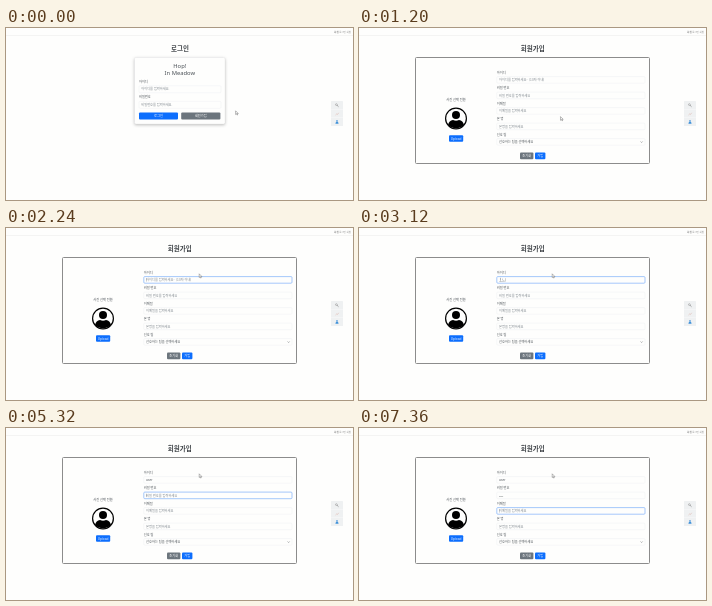
An HTML page that plays this animation: 347 by 172 pixels, repeating every 8 s.

```html
<!DOCTYPE html>
<html lang="ko">
<head>
<meta charset="utf-8">
<style>
  html, body { margin: 0; width: 100%; height: 100%; overflow: hidden; background: #fefefd; }
  svg { display: block; width: 347px; height: 172px; }
  text { font-family: "Noto Sans CJK KR", "Noto Sans CJK", "Noto Sans", sans-serif; white-space: pre; }
  .latin { font-family: "Noto Sans", "Open Sans", sans-serif; }
  .card { filter: drop-shadow(0 1.4px 1.6px rgba(0, 0, 0, .25)); }
</style>
</head>
<body>
<svg id="stage" viewBox="0 0 347 172"></svg>
<script>
const LOOP = 8000;
const BLUE = '#0d6efd', GREY = '#6c757d', INK = '#4a5056', HINT = '#7d858c', PAPER = '#fefefd';
const stage = document.getElementById('stage');

function add(parent, tag, attrs = {}, content = '') {
  const node = document.createElementNS('http://www.w3.org/2000/svg', tag);
  for (const key in attrs) node.setAttribute(key, attrs[key]);
  node.textContent = content;
  parent.append(node);
  return node;
}
const group = parent => add(parent, 'g');
const box = (parent, x, y, width, height, attrs) =>
  add(parent, 'rect', { x, y, width, height, rx: 1, ...attrs });
const path = (parent, d, attrs) => add(parent, 'path', { d, fill: 'none', ...attrs });

// y is the vertical middle of the line of text
function label(parent, content, x, y, attrs = {}) {
  const size = attrs['font-size'] || 3.2;
  return add(parent, 'text', { x, y: y + size * .37, 'font-size': size, fill: INK, ...attrs }, content);
}
const centered = (parent, content, x, y, attrs) =>
  label(parent, content, x, y, { 'text-anchor': 'middle', ...attrs });

function button(parent, content, x, y, width, height, fill) {
  const rect = box(parent, x, y, width, height, { fill });
  centered(parent, content, x + width / 2, y + height / 2, { fill: '#fff' });
  return rect;
}

function field(parent, name, hint, x, y, width, height, hintColor = HINT) {
  label(parent, name, x, y - height / 2 - 4.1);
  const top = y - height / 2;
  box(parent, x, top, width, height, { fill: 'none', stroke: '#dfe2e6', 'stroke-width': .25 });
  const ring = box(parent, x, top, width, height, { fill: 'none', stroke: '#86b7fe', 'stroke-width': .7 });
  const text = label(parent, hint, x + 2.3, y);
  const caret = box(parent, x + 2.2, y - 1.7, .25, 3.4, { rx: 0, fill: INK });

  function update(value, focus) {
    ring.setAttribute('opacity', focus);
    text.textContent = value || hint;
    text.setAttribute('fill', value ? INK : hintColor);
    caret.setAttribute('opacity', focus > .5 ? 1 : 0);
    caret.setAttribute('x', x + 2.2 + (value ? text.getComputedTextLength() + .2 : 0));
  }
  update('', 0);
  return update;
}

// Shared page frame
box(stage, 0, 7, 347, .4, { rx: 0, fill: '#e2e3e4' });
label(stage, '회원', 328, 3.9, { 'font-size': 2.6, fill: '#666' });
label(stage, '로그인 회원', 333.2, 3.9, { 'font-size': 2.4, fill: '#888' });
box(stage, 325, 73, 12, 25, { rx: .6, fill: '#eff1f2' });
for (const y of [81.3, 89.7]) box(stage, 325, y, 12, .3, { rx: 0, fill: PAPER });
add(stage, 'circle', { cx: 330.4, cy: 76.6, r: .9, fill: 'none', stroke: '#888', 'stroke-width': .5 });
path(stage, 'M331.1 77.3l1.4 1.4', { stroke: '#666', 'stroke-width': .6 });
path(stage, 'M329.5 87l1.1-1 .8.5 1.3-1.7', { stroke: '#d9aaa2', 'stroke-width': .5 });
add(stage, 'circle', { cx: 331, cy: 92.9, r: .9, fill: '#5fa2de' });
path(stage, 'M329.4 95.8q0-2 1.6-2t1.6 2z', { fill: '#3c8fd8' });

// Login page
const login = group(stage);
const title = { 'font-size': 6.5, 'font-weight': 700, fill: '#3c4045' };
centered(login, '로그인', 174, 21, title);
box(login, 128.5, 29.5, 90.5, 66.5, { rx: 1.4, fill: PAPER, stroke: '#d8dadc', 'stroke-width': .3, class: 'card' });
const heading = { 'font-size': 5.8, class: 'latin' };
centered(login, 'Hop!', 173.8, 37.7, heading);
centered(login, 'In Meadow', 173.8, 44.5, heading);
field(login, '아이디', '아이디를 입력하세요.', 133, 61.3, 82, 7);
field(login, '비밀번호', '비밀번호를 입력하세요.', 133, 76.8, 82, 7);
button(login, '로그인', 133, 84.4, 39, 7, BLUE);
const joinButton = button(login, '회원가입', 175.2, 84.4, 39.2, 7, GREY);

// Sign-up page
const signup = group(stage);
centered(signup, '회원가입', 173.7, 21, title);
box(signup, 56.5, 29.5, 234, 106, { rx: 1, fill: PAPER, stroke: '#8c8c8c' });
centered(signup, '사진 선택 전환', 97, 71.4);
add(signup, 'circle', { cx: 97, cy: 90.5, r: 10.4, fill: PAPER, stroke: '#000', 'stroke-width': 1.2 });
add(signup, 'circle', { cx: 97, cy: 87.1, r: 4, fill: '#000' });
path(signup, 'M89 97.1Q90 92.3 94 91.9Q97 93.5 100 91.9Q104 92.3 105 97.1Q101.6 100.3 97 100.3T89 97.1Z', { fill: '#000' });
button(signup, 'Upload', 90, 107.3, 14.2, 6.4, BLUE);

const [idField, passwordField, mailField] = [
  ['아이디', '아이디를 입력하세요~ (10자 이내)'],
  ['비밀 번호', '비밀 번호를 입력하세요'],
  ['이메일', '이메일을 입력하세요'],
  ['본 명', '본명을 입력하세요'],
  ['선호 팀', '선호하는 팀을 선택하세요', INK],
].map(([name, hint, color], row) =>
  field(signup, name, hint, 137.8, 51.9 + row * 15.5, 148.2, 6.6, color));
path(signup, 'M281.6 113.5l1 1 1-1', { stroke: INK, 'stroke-width': .45 });
button(signup, '초기화', 161, 124.6, 13.4, 6.7, GREY);
button(signup, '가입', 176, 124.6, 10.4, 6.7, BLUE);

const composing = box(signup, 140.2, 53.7, 5.6, .25, { rx: 0, fill: INK });
const popup = group(signup);
box(popup, 155, 57, 29, 8.4, { rx: .4, fill: PAPER, stroke: '#dadada', 'stroke-width': .3 });
label(popup, 'user', 157, 60.9, { 'font-size': 3 });

// Pointer
const arrow = path(stage, 'M0 0V3.7L.9 2.9 1.5 4.3 2.1 4 1.5 2.7H2.7Z',
  { fill: '#fff', stroke: '#555', 'stroke-width': .4 });
const beam = path(stage, 'M-.6 -1.8H.6M0 -1.8V1.8M-.6 1.8H.6', { stroke: '#444', 'stroke-width': .35 });

const ramp = (t, from, to) => Math.min(1, Math.max(0, (t - from) / (to - from)));
const ease = p => p * p * (3 - 2 * p);
const show = (node, on) => node.setAttribute('visibility', on ? 'visible' : 'hidden');

// Latest value whose start time has passed
const at = (t, steps) => steps.reduce((value, [start, next]) => t >= start ? next : value, '');

const idSteps = [[2800, 'ㅕ'], [2960, 'ㅕㄴ'], [3600, 'u'], [3760, 'us'], [4400, 'use'], [4560, 'user']];
const passwordSteps = [[5840, '•'], [5960, '••'], [6080, '•••'], [6240, '••••']];
const moves = [
  [80, 400, 229.6, 82.8, 201.5, 88.6],
  [1200, 1520, 201.5, 88.6, 183.3, 52.6],
  [1880, 2240, 183.3, 52.6, 193.2, 45.8],
];

function pointerAt(t) {
  const [from, to, x0, y0, x1, y1] = moves.filter(move => t >= move[0]).pop() || moves[0];
  const p = ease(ramp(t, from, to));
  return `translate(${x0 + (x1 - x0) * p} ${y0 + (y1 - y0) * p})`;
}

function draw(t) {
  show(login, t < 1200);
  show(signup, t >= 1200);
  const hover = ramp(t, 280, 400);
  joinButton.setAttribute('fill', `rgb(${108 - 16 * hover},${117 - 18 * hover},${125 - 19 * hover})`);

  idField(at(t, idSteps), t < 5320 ? ramp(t, 1840, 2000) : 0);
  passwordField(at(t, passwordSteps), t >= 5320 && t < 6960 ? 1 : 0);
  mailField('', t >= 6960 ? 1 : 0);
  show(composing, t >= 2800 && t < 3600);
  show(popup, t >= 3680 && t < 4880);

  const overField = t >= 1480 && t < 2120;
  show(arrow, !overField);
  show(beam, overField);
  for (const node of [arrow, beam]) node.setAttribute('transform', pointerAt(t));
}

function tick() {
  draw(performance.now() % LOOP);
  requestAnimationFrame(tick);
}
tick();
</script>
</body>
</html>
```
